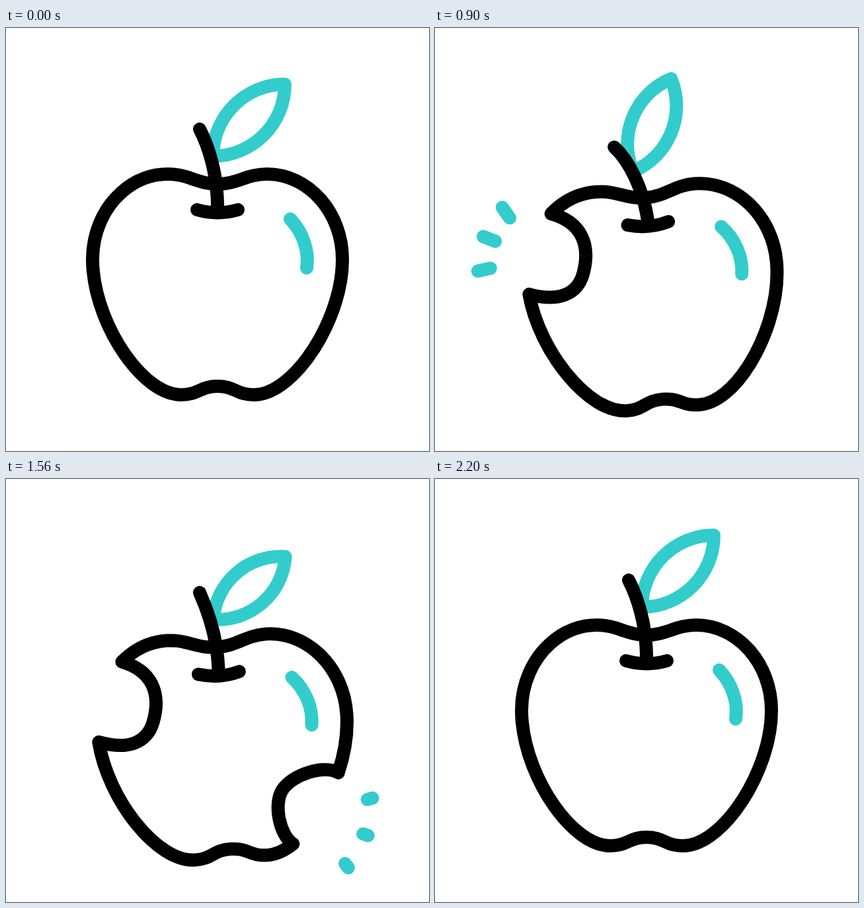
Write an HTML page that moves like this. It is 640x640 px and loops after 2.4 s.

```html
<!DOCTYPE html>
<html lang="en">
<head>
<meta charset="utf-8">
<title>Bitten fruit</title>
<style>
  html, body { margin: 0; width: 100%; height: 100%; overflow: hidden; background: #fff; }
  svg { display: block; width: 100vw; height: 100vh; }
  path { fill: none; stroke: #000; stroke-width: 20; stroke-linecap: round; stroke-linejoin: round; }
  .accent { stroke: #33cccc; }
</style>
</head>
<body>
<svg viewBox="0 0 640 640">
  <g id="fruit">
    <path id="leaf" class="accent"/>
    <path id="body"/>
    <path id="stem"/>
    <path d="M289 275Q320 284 351 275"/>
    <path class="accent" d="M430 289C449 309 459 337 455 363"/>
    <path id="sparks" class="accent"/>
  </g>
</svg>
<script>
const LOOP = 2400, START = 200, BEAT = 500;
const MID = 320, PIVOT_Y = 247;
const H = 0, V = 1;

const el = id => document.getElementById(id);
const clamp = x => Math.min(1, Math.max(0, x));
const ramp = (t, from, to) => clamp((t - from) / (to - from));
const ease = (t, from, to) => { const x = ramp(t, from, to); return x * x * (3 - 2 * x); };
const mix = (a, b, k) => Array.isArray(a) ? a.map((v, i) => mix(v, b[i], k)) : a + (b - a) * k;
const radians = degrees => degrees * Math.PI / 180;

// Eased value between poses that are reached at the given times.
const track = (times, poses, t) =>
  poses.slice(1).reduce((now, pose, i) => mix(now, pose, ease(t, times[i], times[i + 1])), poses[0]);

// Cubic that leaves a and reaches b along a horizontal or vertical tangent.
function curve(a, b, axisA, axisB, k = .55) {
  const pull = (p, q, axis) => p.map((v, i) => i === axis ? mix(v, q[i], k) : v);
  return [a, pull(a, b, axisA), pull(b, a, axisB), b];
}

// Part of a cubic between two parameters.
function sub(cubic, from, to) {
  const split = (p, k) => {
    const q = [0, 1, 2].map(i => mix(p[i], p[i + 1], k));
    const r = [0, 1].map(i => mix(q[i], q[i + 1], k));
    const m = mix(r[0], r[1], k);
    return [[p[0], q[0], r[0], m], [m, r[1], q[2], p[3]]];
  };
  return split(split(cubic, to)[0], from / to)[1];
}

const toPath = cubics => 'M' + cubics[0][0] + cubics.map(c => 'C' + c.slice(1).join(' ')).join('');
const mirror = c => c.map(([x, y]) => [2 * MID - x, y]).reverse();

const hump = [245, 221], side = [131, 350], lobe = [265, 555];
const dip = curve([MID, 236], hump, H, H, .41);
const shoulder = curve(hump, side, H, V);
const flank = curve(side, lobe, V, H, .45);
const notch = curve(lobe, [MID, 542], H, H, .49);
const rightFlank = mirror(flank);

// Hollow in place of two outline pieces; apex and roundness are fractions.
function hollow(pieces, apex, depth, roundness) {
  const a = pieces[0][0], b = pieces[1][3];
  const length = Math.hypot(b[0] - a[0], b[1] - a[1]);
  const [ux, uy] = [(b[0] - a[0]) / length, (b[1] - a[1]) / length];
  const place = ([along, deep]) => [a[0] + ux * along + uy * deep, a[1] + uy * along - ux * deep];
  const top = [apex * length, depth];
  return [
    curve([0, 0], top, V, H, roundness),
    curve(top, [length, 0], H, V, roundness)
  ].map(c => c.map(place));
}

const leftWhole = [sub(shoulder, .42, 1), sub(flank, 0, .061)];
const leftEaten = hollow(leftWhole, .59, 70.7, .64);
const rightWhole = [sub(rightFlank, .215, .45), sub(rightFlank, .45, .69)];
const rightEaten = hollow(rightWhole, .47, 57.5, .42);

const outline = (left, right) => toPath([
  dip, sub(shoulder, 0, .42),
  ...mix(leftWhole, leftEaten, left),
  sub(flank, .061, 1), notch, mirror(notch), sub(rightFlank, 0, .215),
  ...mix(rightWhole, rightEaten, right),
  sub(rightFlank, .69, 1), mirror(shoulder), mirror(dip)
]) + 'Z';

// Stem and leaf lean together; a negative bend leans left.
const bends = [0, -.9, 1.1, -.72, 0];
const bendTimes = [START, 820, 1370, 1800, 2200];

function leafPose(bend) {
  const a = radians(22.5 * bend), s = Math.sin(a), c = Math.cos(a);
  const foot = [0, 0], tip = [109, -109];
  const place = ([x, y]) => [313 + 12 * bend + x * c - y * s, 194 - bend + x * s + y * c];
  return [curve(foot, tip, V, H), curve(tip, foot, V, H)].map(half => half.map(place));
}
const leafPoses = bends.map(leafPose);

const stem = bend => toPath([[
  [293 + 18.5 * bend, 153 - 3.5 * bend], [306 + 9 * bend, 178], [MID + 4.5 * bend, 220], [MID, 270]
]]);

// Three sparks fan out from each bite, then shrink towards their outer ends.
const bursts = [
  { at: 625, x: 150, y: 313, facing: 205.7, inner: 70 },
  { at: 1125, x: 440, y: 498, facing: 23, inner: 75.5 }
];

function burst({ at, x, y, facing, inner }, t) {
  const head = ramp(t, at, at + 300), tail = ramp(t, at + 230, at + 530);
  if (head <= tail) return '';
  return [-1, 0, 1].map(i => {
    const a = radians(facing + 33.5 * i);
    const point = k => {
      const r = inner - (i ? 0 : 4.5) + 25.5 * k;
      return [x + r * Math.cos(a), y + r * Math.sin(a)];
    };
    return `M${point(tail)}L${point(head)}`;
  }).join('');
}

const swings = [0, -13.4, 11, -7.3, 0];
const swingTimes = swings.map((_, i) => START + i * BEAT);

function draw(t) {
  const angle = track(swingTimes, swings, t);
  const drop = 26.3 * (ease(t, START, 1200) - ease(t, 1200, 2200));
  const heal = 1 - ease(t, 1840, 2140);
  el('fruit').setAttribute('transform', `translate(0 ${drop}) rotate(${angle} ${MID} ${PIVOT_Y})`);
  el('body').setAttribute('d', outline(ease(t, 620, 700) * heal, ease(t, 1120, 1200) * heal));
  el('leaf').setAttribute('d', toPath(track(bendTimes, leafPoses, t)) + 'Z');
  el('stem').setAttribute('d', stem(track(bendTimes, bends, t)));
  el('sparks').setAttribute('d', bursts.map(b => burst(b, t)).join(''));
}

const begin = performance.now();
function tick() {
  draw((performance.now() - begin) % LOOP);
  requestAnimationFrame(tick);
}
tick();
</script>
</body>
</html>
```
